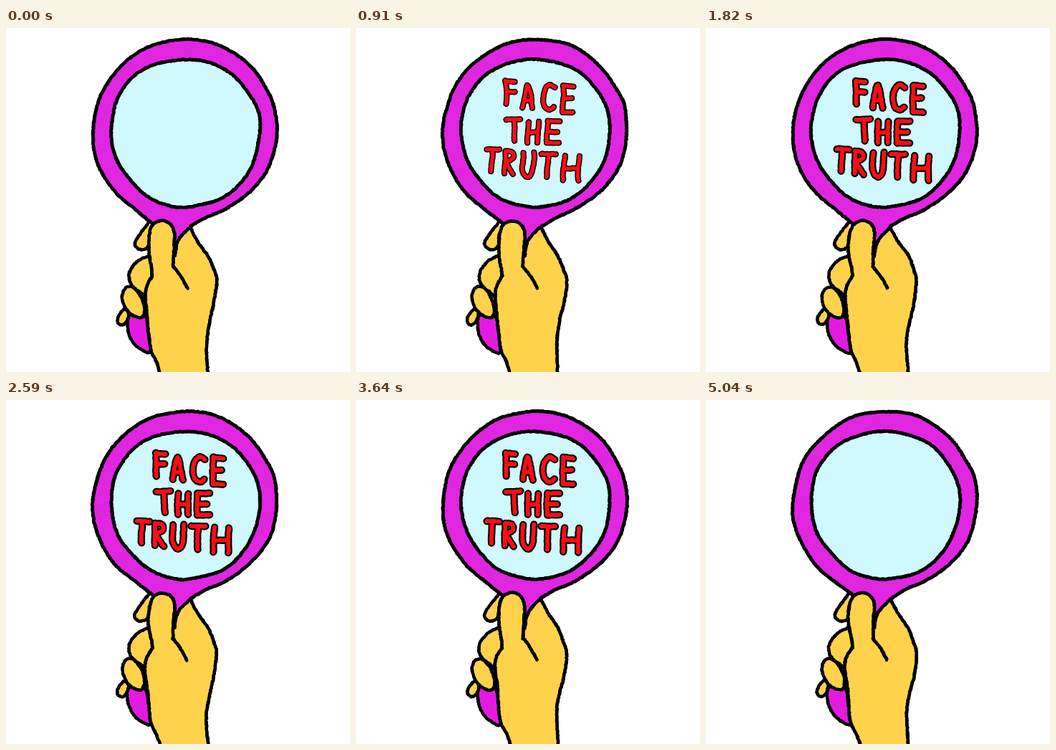
An HTML page with a canvas that plays this animation: 480x480 px, repeating every 5110 ms.

```html
<!DOCTYPE html>
<html lang="en">
<head>
<meta charset="utf-8">
<title>Hand mirror</title>
<style>
html, body { margin: 0; width: 100%; height: 100%; overflow: hidden; background: #fff; }
canvas { display: block; width: 480px; height: 480px; }
</style>
</head>
<body>
<canvas id="stage" width="480" height="480" role="img" aria-label="FACE THE TRUTH"></canvas>
<script>
const ctx = document.getElementById('stage').getContext('2d');
const LOOP = 5110, STEP = 70;
const HOLDS = [3, 18, 28, 38];
const PURPLE = '#e026e0', GLASS = '#cff8ff', SKIN = '#ffd24c', RED = '#fb0d12';

// Flat lists of x, y control points
const RING = [204,272, 181,254, 155,232, 136,205, 124,176, 121,148, 125,118, 135,88,
  153,61, 179,38, 210,22, 250,16, 290,21, 320,36, 345,58, 362,83, 374,108, 378,145,
  371,183, 357,210, 335,233, 305,253, 280,264, 258,277];
const LENS = [248,44, 285,49, 315,64, 338,90, 352,118, 354,148, 346,185, 328,215, 300,238,
  262,249, 235,249, 200,237, 175,214, 155,185, 147,150, 150,115, 160,90, 180,66, 210,50];
const SPIKE = [258,277, 244,291, 238,302, 235,318];
const THUMB = [204,346, 203,335, 199,312, 200,290, 205,275, 217,269, 229,273, 235,285,
  234,308, 233,333];
const CREASE = [233,333, 243,346, 253,363];
const RIGHT = [258,279, 268,298, 282,318, 290,338, 294,354, 290,385, 284,410, 280,440, 282,484];
const LEFT = [204,346, 196,360, 194,376, 197,400, 199,426, 202,450, 210,466, 216,484];
const INDEX = [200,270, 189,284, 180,298, 181,305, 189,309, 198,304, 200,288];
const MIDDLE = [198,318, 184,325, 173,339, 172,352, 178,362, 188,369, 197,376, 205,350];
const RINGER = [174,361, 166,364, 162,376, 167,392, 178,402, 189,404, 193,394, 190,379, 182,366];
const PINKY = [165,392, 156,403, 156,411, 162,414, 168,409, 171,398];
const HANDLE = [172,401, 170,420, 177,438, 189,449, 202,452, 199,426, 194,403];

const FACE = [
  [209,74, 210,106], [209,74, 222,75], [210,89, 221,89],
  [233,111, 239,80, 247,112], [236,101, 245,101],
  [277,83, 270,79, 263,86, 261,98, 264,110, 271,114, 277,110],
  [289,80, 289,117], [289,80, 303,82], [289,98, 301,98], [289,117, 303,118]
];
const THE = [
  [209,128, 229,127], [220,128, 222,157],
  [240,131, 240,160], [254,131, 254,160], [240,146, 254,146],
  [267,130, 267,160], [267,130, 284,130], [267,145, 281,145], [267,160, 284,160]
];
const TRUTH = [
  [182,169, 200,170], [190,170, 189,200],
  [208,172, 208,203], [208,172, 217,173, 219,181, 209,187], [209,187, 220,204],
  [233,174, 233,198, 240,208, 247,199, 248,174],
  [258,176, 278,176], [268,177, 267,208],
  [291,178, 289,212], [311,179, 310,213], [290,196, 310,196]
];
const WORDS = [FACE, THE, TRUTH];

function seeded(seed) {
  let s = (seed * 7919 + 104729) | 0;
  return () => {
    s = (s + 0x6d2b79f5) | 0;
    let t = Math.imul(s ^ (s >>> 15), 1 | s);
    t ^= t + Math.imul(t ^ (t >>> 7), 61 | t);
    return ((t ^ (t >>> 14)) >>> 0) / 4294967296;
  };
}

// Catmull-Rom curve sampled about every two pixels
function curve(flat, closed) {
  const p = [];
  for (let i = 0; i < flat.length; i += 2) p.push([flat[i], flat[i + 1]]);
  const n = p.length, out = [];
  const at = i => closed ? p[(i + n) % n] : p[Math.max(0, Math.min(n - 1, i))];
  for (let i = 0; i < (closed ? n : n - 1); i++) {
    const [a, b, c, d] = [at(i - 1), at(i), at(i + 1), at(i + 2)];
    const count = Math.max(2, Math.round(Math.hypot(c[0] - b[0], c[1] - b[1]) / 2));
    for (let k = 0; k < count; k++) {
      const t = k / count;
      out.push([0, 1].map(j => b[j] + 0.5 * t * (c[j] - a[j] +
        t * (2 * a[j] - 5 * b[j] + 4 * c[j] - d[j] + t * (3 * (b[j] - c[j]) + d[j] - a[j])))));
    }
  }
  out.push(closed ? out[0] : p[n - 1]);
  return out;
}

const shape = {};
for (const [name, pts] of Object.entries({ RING, SPIKE, THUMB, CREASE, RIGHT, LEFT, INDEX, MIDDLE }))
  shape[name] = curve(pts);
for (const [name, pts] of Object.entries({ LENS, RINGER, PINKY, HANDLE }))
  shape[name] = curve(pts, true);
const PALM = [...shape.SPIKE.slice().reverse(), ...shape.RIGHT,
  ...shape.LEFT.slice().reverse(), ...shape.THUMB];
const letters = WORDS.flat().map(s => curve(s));

function trace(pts) {
  ctx.beginPath();
  pts.forEach(([x, y]) => ctx.lineTo(x, y));
}

function fill(pts, color) {
  trace(pts);
  ctx.fillStyle = color;
  ctx.fill();
}

// Slow drift plus fine grain, like a redrawn marker line
function ink(pts, seed, width = 4.4) {
  const rnd = seeded(seed);
  const a = rnd() * 6.3, b = rnd() * 6.3;
  ctx.strokeStyle = '#000';
  ctx.lineWidth = width;
  for (let pass = 0; pass < 2; pass++) {
    trace(pts.map(([x, y]) => [
      x + 0.45 * Math.sin(y / 13 + a) + (rnd() - 0.5) * 1.3,
      y + 0.45 * Math.sin(x / 13 + b) + (rnd() - 0.5) * 1.3
    ]));
    ctx.stroke();
  }
}

function lettering(amount, seed) {
  if (amount <= 0) return;
  const rnd = seeded(seed);
  const phase = rnd() * 6.3, loose = (1 - amount) * 3;
  const lines = letters.map(pts => pts.map(([x, y]) => [
    x + (0.35 + loose) * Math.sin(y / 7 + phase) + (rnd() - 0.5) * 0.7,
    y + 0.35 * Math.sin(x / 9 + phase) + (rnd() - 0.5) * 0.7
  ]));
  const core = 5.8 * Math.sqrt(amount);
  const draw = (color, width) => {
    ctx.strokeStyle = color;
    ctx.lineWidth = width;
    lines.forEach(l => { trace(l); ctx.stroke(); });
  };
  ctx.globalAlpha = Math.min(1, amount * 2.5);
  draw('#000', core + 4.4 * amount * amount);
  draw(RED, core);
  ctx.globalAlpha = 1;
}

const ramp = (t, from, to) => {
  const k = Math.max(0, Math.min(1, (t - from) / (to - from)));
  return k * k * (3 - 2 * k);
};

function scene(n) {
  const t = n * STEP, seed = n * 40;
  ctx.fillStyle = '#fff';
  ctx.fillRect(0, 0, 480, 480);
  ctx.lineJoin = ctx.lineCap = 'round';

  fill([...shape.RING, ...shape.SPIKE], PURPLE);
  fill(shape.LENS, GLASS);
  ink(shape.RING, seed + 1);
  ink(shape.LENS, seed + 2);
  lettering(ramp(t, 350, 1120) * (1 - ramp(t, 3780, 4410)), seed + 3);

  [['HANDLE', '#e31be0'], ['PINKY', SKIN], ['INDEX', SKIN], ['MIDDLE', SKIN], ['RINGER', SKIN]]
    .forEach(([name, color], i) => {
      fill(shape[name], color);
      ink(shape[name], seed + 4 + i, 4);
    });

  fill(PALM, SKIN);
  ['SPIKE', 'RIGHT', 'LEFT', 'THUMB', 'CREASE'].forEach((name, i) =>
    ink(shape[name], seed + 10 + i, 4.2));
}

const start = performance.now();
let shown = -1;
function tick(now) {
  let n = Math.floor((Math.max(0, now - start) % LOOP) / STEP);
  if (HOLDS.includes(n)) n--;
  if (n !== shown) scene(shown = n);
  requestAnimationFrame(tick);
}
tick(start);
</script>
</body>
</html>
```
